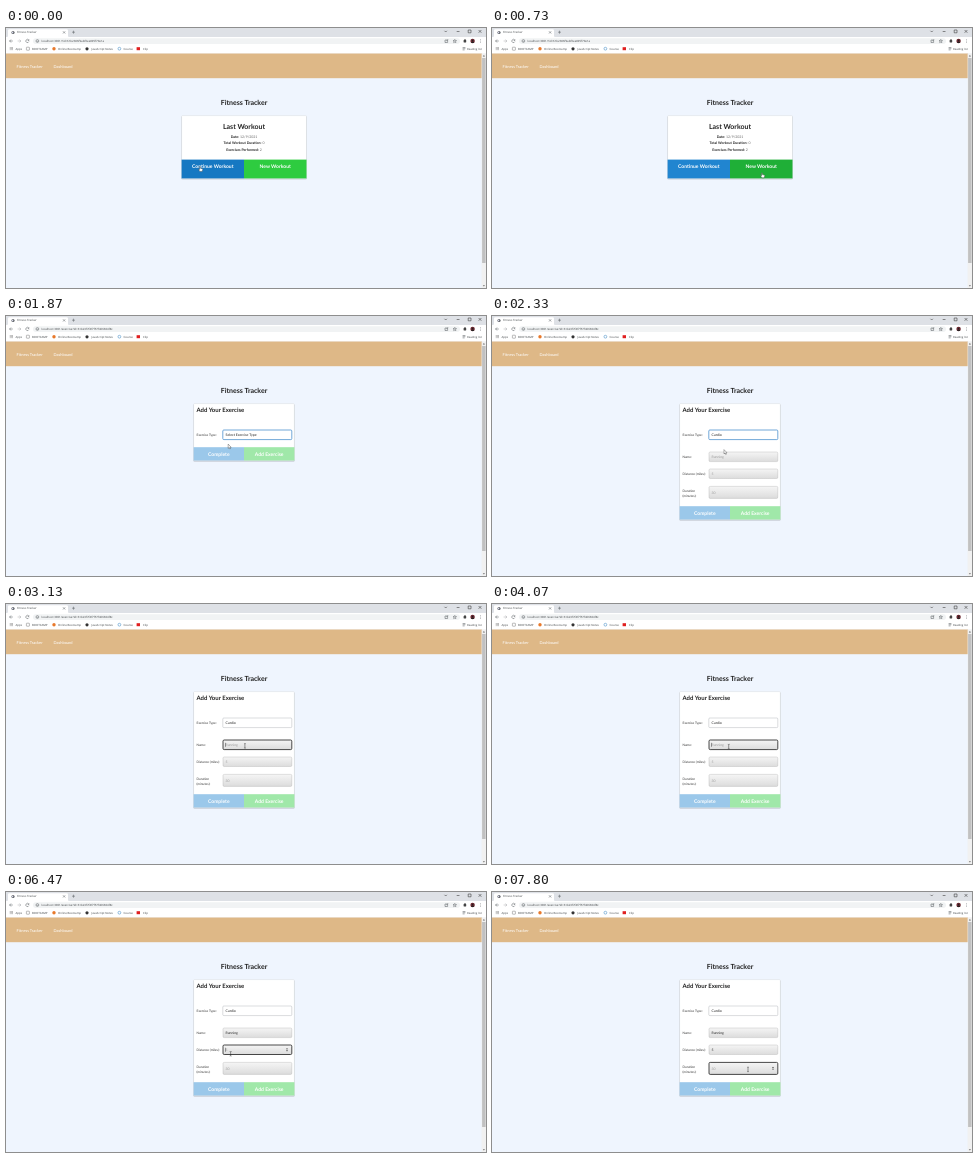
Write an HTML page that moves like this. It is 480 px wide and 260 px high and loops after 8 s.

```html
<!DOCTYPE html>
<html lang="en">
<head>
<meta charset="utf-8">
<title>Fitness Tracker</title>
<style>
  html, body { margin: 0; width: 100%; height: 100%; overflow: hidden; background: #eff5fe; }
  svg { display: block; width: 100vw; height: 100vh; }
  text { font-family: Lato, sans-serif; text-rendering: geometricPrecision; white-space: pre; }
  .ui { font-family: "Open Sans", sans-serif; font-size: 2.85px; fill: #3c4043; }
  .line { fill: none; stroke: #5f6368; stroke-width: .55; }
  .bold { font-weight: 700; }
  .mid { text-anchor: middle; }
</style>
</head>
<body>
<svg id="stage" viewBox="0 0 480 260" xmlns="http://www.w3.org/2000/svg"></svg>
<script>
const LOOP = 8000;
const stage = document.getElementById('stage');

const rect = (x, y, w, h, fill, more = '') =>
  `<rect x="${x}" y="${y}" width="${w}" height="${h}" fill="${fill}" ${more}/>`;
const text = (x, y, str, size, more = '') =>
  `<text x="${x}" y="${y}" font-size="${size}" ${more}>${str}</text>`;
const ui = (x, y, str, more = '') => `<text class="ui" x="${x}" y="${y}" ${more}>${str}</text>`;
const line = (d, more = '') => `<path class="line" d="${d}" ${more}/>`;
const dot = (x, y, r, fill) => `<circle cx="${x}" cy="${y}" r="${r}" fill="${fill}"/>`;
const button = (x, y, w, h, fill, label, base, id = '') =>
  rect(x, y, w, h, fill, id && `id="${id}"`) +
  text(x + w / 2, base, label, 5, 'class="bold mid" fill="#fff"');
const card = (x, y, w, h, id = '') =>
  rect(x - .3, y + .6, w + .6, h + .5, '#c9ced6', `rx="1.2" ${id && `id="${id}Shade"`}`) +
  rect(x, y, w, h, '#fff', `rx="1" stroke="#cdd1d7" stroke-width=".4" ${id && `id="${id}"`}`);

function browser() {
  const marks = [
    [26, 'BOOTCAMP', '#777'], [52, 'Online Bootcamp', '#e8792b'],
    [85.5, 'JavaScript Notes', '#333'], [117.5, 'Course', '#4a90c8'], [137, 'Clip', '#e02020']
  ];
  const icons = [
    rect(20.4, 19.2, 3, 3, 'none', 'rx=".4" stroke="#777" stroke-width=".5"'),
    dot(48, 20.7, 1.7, '#e8792b'), dot(81, 20.8, 1.6, '#333'),
    '<circle cx="113.4" cy="20.7" r="1.4" fill="none" stroke="#4a90c8" stroke-width=".6"/>',
    rect(130.6, 19.2, 3.4, 3, '#e02020')
  ];
  let grid = '';
  for (let i = 0; i < 9; i++)
    grid += rect(3.8 + i % 3 * 1.1, 19.2 + Math.floor(i / 3) * 1.1, .7, .7, '#777');
  return rect(0, 0, 480, 9, '#dee1e6') +
    '<path d="M1 9Q2 9 2 8V2.6Q2 1.2 3.4 1.2H60.6Q62 1.2 62 2.6V8Q62 9 63 9Z" fill="#fff"/>' +
    rect(0, 9, 480, 16.5, '#fff') +
    '<g id="favicon">' + dot(7, 4.5, 1.6, '#5f6368') +
    '<path d="M5.7 4.2L7 3.6L7.3 4.8L6.4 5.6Z" fill="#dde"/></g>' +
    '<path id="loading" d="M7 2.9A1.6 1.6 0 1 1 5.4 4.5" fill="none" stroke="#4a80d0" stroke-width=".6"/>' +
    ui(11, 5.4, 'Fitness Tracker') +
    line('M57 3.3l2.2 2.2m0-2.2l-2.2 2.2M67.5 2.7v3m-1.5-1.5h3') +
    line('M438.5 2.8l1.2 1.2l1.2-1.2M450.7 3.5h2.8M462.2 2h2.8v2.8h-2.8zM472.6 2l2.8 2.8m0-2.8l-2.8 2.8', 'style="stroke:#333"') +
    line('M6.8 13H3.6m1.4-1.5L3.5 13L5 14.5') +
    line('M11.6 13h3.2m-1.4-1.5l1.5 1.5l-1.5 1.5', 'opacity=".5"') +
    line('M22.7 12A1.6 1.6 0 1 0 22.9 13.6M22.9 11.3v1.2h-1.2') +
    rect(27, 10.2, 427, 5.8, '#f1f3f4', 'rx="2.9"') +
    '<circle class="line" cx="31.4" cy="13" r="1.4"/>' + line('M31.4 12.8v1') +
    ui(35.5, 14, '', 'id="url"') +
    line('M439 12h2.6v2.5H439zM440.3 13.2l1.8-2M448.8 11.4l.5 1.1l1.2.1l-.9.8l.3 1.2l-1.1-.6l-1.1.6l.3-1.2l-.9-.8l1.2-.1z') +
    rect(457.6, 11.9, 2.6, 2.6, '#444', 'rx=".4"') + dot(459, 11.7, .7, '#444') +
    dot(466.6, 13, 2.2, '#6b2730') + dot(466.6, 12.4, .75, '#222') +
    '<path d="M465.1 14.5q1.5-2.2 3 0q-1.5 1-3 0z" fill="#222"/>' +
    [11.6, 13, 14.4].map(y => dot(474.5, y, .4, '#5f6368')).join('') +
    grid + ui(9.5, 21.8, 'Apps') +
    marks.map(([x, label]) => ui(x, 21.8, label)).join('') + icons.join('') +
    line('M456.6 19.5h2.8m-2.8 1.2h2.8m-2.8 1.2h2') + ui(461, 21.8, 'Reading list', 'style="font-size:2.75px"');
}

function site() {
  return rect(0, 25.5, 476, 24.7, '#deb887') +
    text(10.5, 39.8, 'Fitness Tracker', 4, 'fill="#fff"') +
    text(47.5, 39.8, 'Dashboard', 4, 'fill="#fff"') +
    rect(475.6, 25.5, 4.4, 234.5, '#f1f1f1') + rect(476.1, 30, 3.5, 205, '#c1c1c1') +
    '<path d="M476.8 28.4l1.1-1.3l1.1 1.3zM476.8 257.2l1.1 1.3l1.1-1.3z" fill="#666"/>' +
    text(238, 77.4, 'Fitness Tracker', 7, 'class="bold mid" fill="#222"');
}

function summary() {
  const rows = [['Date', '12/9/2021'], ['Total Workout Duration', '0'], ['Exercises Performed', '2']];
  return '<g id="summary">' + card(175.6, 87.6, 124.9, 62.8) +
    text(238, 101.2, 'Last Workout', 7, 'class="bold mid" fill="#222"') +
    rows.map(([k, v], i) => text(238, 110.2 + i * 6.25,
      `<tspan class="bold">${k}:</tspan> <tspan fill="#666">${v}</tspan>`, 3.5, 'class="mid" fill="#222"')).join('') +
    button(175.6, 131.6, 62.4, 18.8, '#2185d0', 'Continue Workout', 140, 'blue') +
    button(238, 131.6, 62.5, 18.8, '#2ecc40', 'New Workout', 140, 'green') + '</g>';
}

const fields = [
  { id: 'name', y: 136, h: 9.6, hint: 'Running', focus: [2870, 6070],
    typed: [4470, 4600, 4800, 4870, 5070, 5130, 5270] },
  { id: 'distance', y: 153, h: 9.5, hint: '5', focus: [6070, 7270], typed: [6530], number: true },
  { id: 'duration', y: 170.4, h: 12, hint: '30', focus: [7270, LOOP], typed: [], number: true }
];

function form() {
  const label = (y, str) => text(190.5, y, str, 3.25, 'fill="#333"');
  const input = f => {
    const mid = f.y + f.h / 2;
    return rect(217, f.y, 68.8, f.h, 'url(#grey)', `id="${f.id}" rx="1.2"`) +
      text(219.6, mid + 1.1, '', 3.4, `id="${f.id}Text"`) +
      (f.number ? `<path id="${f.id}Spin" d="M280 ${mid - .4}l1-1.3l1 1.3zM280 ${mid + .4}l1 1.3l1-1.3z" fill="#444"/>` : '');
  };
  return '<g id="form">' + card(187.6, 87.6, 100.8, 57, 'panel') +
    text(190.5, 96.2, 'Add Your Exercise', 6, 'class="bold" fill="#222"') +
    label(120.1, 'Exercise Type:') +
    rect(216.8, 114, 69, 9.6, '#fff', 'id="select" rx="1"') +
    text(219.6, 119.9, '', 3.5, 'id="choice" fill="#222"') +
    '<g id="details">' + label(142.2, 'Name:') + label(159, 'Distance (miles):') +
    label(176.2, 'Duration') + label(180.7, '(minutes):') + fields.map(input).join('') +
    rect(0, 0, .4, 4, '#111', 'id="caret"') + '</g>' +
    '<g id="actions">' + button(187.6, 131.2, 50.4, 13.3, '#9bc8ea', 'Complete', 139.7) +
    button(238, 131.2, 50.4, 13.3, '#a0e8a9', 'Add Exercise', 139.7) + '</g></g>';
}

const edge = 'stroke="#222" stroke-width=".35" stroke-linejoin="round"';
const pointers = `<g id="pointer">
  <path id="arrow" d="M0 0V4.3L1 3.4L1.7 4.9L2.3 4.6L1.7 3.2H3Z" fill="#fff" ${edge}/>
  <path id="hand" d="M-.4 .4Q0-.2 .4 .4V2L2.4 2.5Q2.9 2.7 2.7 3.5L2.2 5.2H-.2L-1.5 3.2Q-1.2 2.7-.4 3.2Z" fill="#fff" ${edge}/>
  <path id="beam" d="M-.9-2.3Q0-2.3 0-1.9Q0-2.3 .9-2.3M0-1.9V1.9M-.9 2.3Q0 2.3 0 1.9Q0 2.3 .9 2.3" fill="none" stroke="#222" stroke-width=".45"/>
</g>`;

stage.innerHTML = `<defs><linearGradient id="grey" x2="0" y2="1">
  <stop stop-color="#f5f5f5"/><stop offset="1" stop-color="#dcdcdc"/></linearGradient></defs>` +
  rect(0, 25, 480, 235, '#eff5fe') + browser() + site() + summary() + form() + pointers;

const el = {};
stage.querySelectorAll('[id]').forEach(n => el[n.id] = n);
const show = (n, on) => n.setAttribute('display', on ? 'inline' : 'none');
const set = (n, attrs) => { for (const k in attrs) n.setAttribute(k, attrs[k]); };
const write = (n, str) => { if (n.textContent !== str) n.textContent = str; };

// time, x, y of the pointer
const path = [
  [0, 194, 138.2], [30, 194, 138.2], [200, 267.5, 143.5], [400, 267.5, 143.5], [660, 270, 144.6],
  [900, 270, 144.6], [1200, 226, 119], [1600, 226, 119], [1850, 222, 128], [2130, 232, 133.6],
  [2400, 232, 133.6], [2800, 236, 141], [3070, 236, 141], [3450, 278, 154], [3870, 237.5, 144],
  [3930, 237.5, 144], [4070, 236.7, 142.6], [5650, 236.7, 142.6], [6100, 224.6, 161.2],
  [6270, 224.6, 161.8], [6600, 224.6, 161.8], [7200, 255, 178.5], [7530, 255, 178.5],
  [7780, 256, 177.4], [LOOP, 256, 177.4]
];

function pointerAt(t) {
  const i = path.findIndex(p => p[0] > t);
  const [a, b] = [path[i - 1], path[i]];
  const u = (t - a[0]) / (b[0] - a[0]);
  const k = u * u * (3 - 2 * u);
  return [a[1] + (b[1] - a[1]) * k, a[2] + (b[2] - a[2]) * k];
}

function drawField(f, t) {
  const [from, to] = f.focus;
  const active = t >= from && t < to;
  const count = f.typed.filter(at => at <= t).length;
  const label = el[f.id + 'Text'];
  write(label, count ? f.hint.slice(0, count) : f.hint);
  label.setAttribute('fill', count ? '#222' : '#999');
  set(el[f.id], { stroke: active ? '#1c1c1c' : '#b4b4b4', 'stroke-width': active ? .8 : .4 });
  if (f.number) show(el[f.id + 'Spin'], active);
  if (!active) return;
  const since = t - (count ? f.typed[count - 1] : from);
  show(el.caret, since % 1060 < 530);
  set(el.caret, { x: 219.5 + (count ? label.getComputedTextLength() : 0), y: f.y + f.h / 2 - 2 });
}

function draw(t) {
  const onForm = t >= 870, open = t >= 2270;
  const [x, y] = pointerAt(t);

  show(el.summary, !onForm);
  show(el.form, onForm);
  show(el.details, open);
  const loading = t >= 800 && t < 1000;
  show(el.loading, loading);
  show(el.favicon, !loading);
  set(el.loading, { transform: `rotate(${t * .5 % 360} 7 4.5)` });
  write(el.url, 'localhost:3001/' + (onForm ? 'exercise?id=61b23f7f4f7f57f466604f8c' : '?id=61b2386f9abf6ee895f70e1a'));
  set(el.blue, { fill: x < 238 ? '#1678c2' : '#2185d0' });
  set(el.green, { fill: x < 238 ? '#2ecc40' : '#1faf37' });

  set(el.panel, { height: open ? 116 : 57 });
  set(el.panelShade, { height: open ? 116.5 : 57.5 });
  set(el.actions, { transform: `translate(0 ${open ? 59 : 0})` });
  write(el.choice, open ? 'Cardio' : 'Select Exercise Type');
  const picked = t >= 1270 && t < 2870;
  set(el.select, { stroke: picked ? '#4f92cf' : '#a3a7ac', 'stroke-width': picked ? .8 : .4 });
  show(el.caret, false);
  fields.forEach(f => drawField(f, t));

  const overField = open && fields.some(f => y > f.y && y < f.y + f.h);
  show(el.hand, !onForm);
  show(el.beam, overField);
  show(el.arrow, onForm && !overField);
  const typing = t >= 4470 && t < 5670 || t >= 6530 && t < 6680;
  show(el.pointer, !typing);
  set(el.pointer, { transform: `translate(${x} ${y})` });
}

const start = performance.now();
function tick() {
  draw((performance.now() - start) % LOOP);
  requestAnimationFrame(tick);
}
tick();
</script>
</body>
</html>
```
